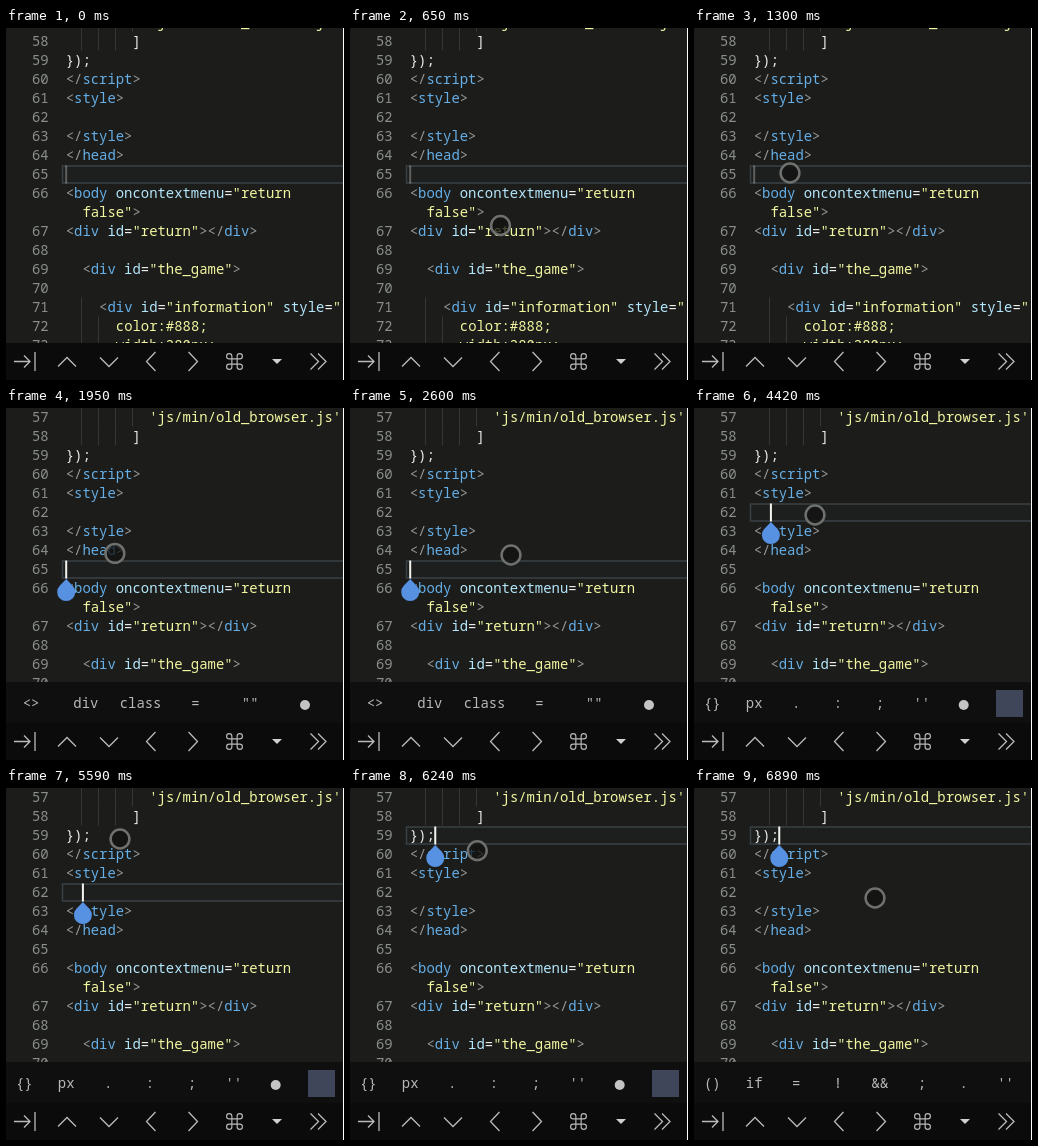
An HTML page that plays this animation: 338x352 px, repeating every 7.28 s.

```html
<!DOCTYPE html>
<html lang="en">
<head>
<meta charset="utf-8">
<title>Code editor</title>
<style>
html, body { margin: 0; width: 100%; height: 100%; overflow: hidden; background: #1c1d1b; }
svg { display: block; }
text { font: 500 13.92px "Noto Sans Mono", "DejaVu Sans Mono", monospace; white-space: pre; fill: #ececea; }
.num { font-weight: 400; fill: #8b8f8c; }
.g { fill: #969a9a; }
.b { fill: #65aee6; }
.a { fill: #b4e6fb; }
.y { fill: #f2f6a0; }
.guide { stroke: #343733; }
.key { font-weight: 400; text-anchor: middle; fill: #b8b8b8; }
.icons { fill: none; stroke: #bababa; stroke-width: 1.3; }
</style>
</head>
<body>
<svg width="338" height="352" viewBox="0 0 338 352">
  <rect width="338" height="352" fill="#1c1d1b"/>
  <g id="page">
    <rect id="current" x="56.5" width="290" height="17" fill="#1d1f1f" stroke="#3a4144" stroke-width="1.5"/>
    <g id="code"></g>
    <g id="caret">
      <rect x="-.5" y="-8.5" width="2" height="18" fill="#f4f4ee"/>
      <path id="handle" d="M.5 10l6.5 6.8A9 9 0 1 1-6 16.8z" fill="#5691e2"/>
    </g>
  </g>
  <circle id="ring" r="9.4" fill="#111" fill-opacity=".75" stroke="#6f716e" stroke-width="2.5"/>
  <g id="bars"></g>
  <rect y="315" width="338" height="37" fill="#0b0b0c"/>
  <g class="icons">
    <path d="M8 333.5H24M18 327.5l6 6-6 6M29 324v19"/>
    <path d="M52 338.5l9-9 9 9M94 329.5l9 9 9-9"/>
    <path d="M149.5 324l-9 9.5 9 9.5M182.5 324l9 9.5-9 9.5"/>
    <path transform="translate(228.5 333.5) scale(.88)" d="M-3 3V-6a3 3 0 1 0-3 3H6a3 3 0 1 0-3-3V6a3 3 0 1 0 3-3H-6a3 3 0 1 0 3 3z"/>
    <path d="M266 331h10l-5 5z" fill="#d0d0d0" stroke="none"/>
    <path d="M304.5 325.5l8 8-8 8M312 325.5l8 8-8 8"/>
  </g>
  <rect x="337" width="1" height="352" fill="#fff"/>
</svg>
<script>
const $ = id => document.getElementById(id);
const LEFT = 59.7, CHAR = 8.352, ROW = 19, STEP = 130, LOOP = 7280;
const rowY = i => 9 + ROW * i;
const esc = s => s.replace(/&/g, '&amp;').replace(/</g, '&lt;');

// Each piece of a row starts with its colour class; "w" is plain.
const tag = (name, end = '') => `g<${end}|b${name}|g>`;
const rows = [
  [57, 10, "y'js/min/old_browser.js'"],
  [58, 8, 'w]'],
  [59, 0, 'w});'],
  [60, 0, tag('script', '/')],
  [61, 0, tag('style')],
  [62, 0, ''],
  [63, 0, tag('style', '/')],
  [64, 0, tag('head', '/')],
  [65, 0, ''],
  [66, 0, 'g<|bbody|a oncontextmenu|w=|y"return'],
  ['', 2, 'yfalse"|g>'],
  [67, 0, 'g<|bdiv|a id|w=|y"return"|g></|bdiv|g>'],
  [68, 0, ''],
  [69, 2, 'g<|bdiv|a id|w=|y"the_game"|g>'],
  [70, 0, ''],
  [71, 4, 'g<|bdiv|a id|w=|y"information"|a style|w=|y"'],
  [72, 6, 'ycolor:#888;'],
  [73, 6, 'ywidth:280px;']
];

$('code').innerHTML = rows.map(([num, indent, src], i) => {
  const y = rowY(i), base = y + 5;
  let out = `<text class="num" x="26" y="${base}">${num}</text>`;
  for (let c = 2; c < indent; c += 2) {
    const x = Math.round(LEFT + c * CHAR) - .5;
    out += `<path class="guide" d="M${x} ${y - 9.5}v${ROW}"/>`;
  }
  const spans = src.split('|').map(p => `<tspan class="${p[0]}">${esc(p.slice(1))}</tspan>`);
  return out + `<text x="${LEFT + indent * CHAR}" y="${base}">${spans.join('')}</text>`;
}).join('');

// Key rows: "@" is the round button, "#" the colour swatch.
const bars = [
  ['<> div class = "" @', 25, 54.8],
  ["{} px . : ; '' @ #", 18.3, 41.9],
  ["() if = ! && ; . ''", 18.3, 41.9]
];
$('bars').innerHTML = bars.map(([keys, start, gap]) =>
  '<g><rect y="274" width="338" height="42" fill="#0f0f10"/>' +
  keys.split(' ').map((k, i) => {
    const x = start + gap * i;
    if (k === '@') return `<circle cx="${x}" cy="297" r="5" fill="#c4c4c4"/>`;
    if (k === '#') return '<rect x="302" y="282" width="27" height="27" fill="#40465a"/>';
    return `<text class="key" x="${x}" y="299.5">${esc(k)}</text>`;
  }).join('') + '</g>').join('');

// Touch ring: time, x, y
const path = [
  [0, 205, 250], [1300, 96, 145], [1690, 96, 145], [2600, 161, 147],
  [2730, 161, 147], [3380, 116, 106], [3640, 116, 106], [3770, 121, 107],
  [4550, 121, 107], [5590, 114, 51], [5980, 114, 51], [6890, 181, 110], [LOOP, 181, 110]
];
const ease = p => p * p * (3 - 2 * p);

function ringAt(t) {
  const i = path.findIndex(k => k[0] > t);
  const [t0, x0, y0] = path[i - 1], [t1, x1, y1] = path[i];
  const p = ease((t - t0) / (t1 - t0));
  return [x0 + (x1 - x0) * p, y0 + (y1 - y0) * p];
}

function draw(now) {
  const t = Math.floor(now % LOOP / STEP) * STEP;
  const focused = t >= 1820;
  const [row, col] = t < 3640 ? [8, 0] : t < 6110 ? [5, 2] : [2, 3];
  const bar = !focused ? -1 : t < 4160 ? 0 : t < 6630 ? 1 : 2;
  const y = rowY(row);

  $('page').setAttribute('transform', `translate(0 ${focused ? 0 : -15})`);
  $('current').setAttribute('y', y - 8);
  $('caret').setAttribute('transform', `translate(${LEFT + col * CHAR} ${y})`);
  $('caret').setAttribute('opacity', focused ? 1 : .3);
  $('handle').setAttribute('visibility', focused ? 'visible' : 'hidden');
  [...$('bars').children].forEach((g, i) => g.setAttribute('visibility', i === bar ? 'visible' : 'hidden'));

  const [rx, ry] = ringAt(t);
  $('ring').setAttribute('transform', `translate(${rx} ${ry})`);
  $('ring').setAttribute('opacity', Math.min(1, t / 390));
}

const begin = performance.now();
function tick() {
  draw(performance.now() - begin);
  requestAnimationFrame(tick);
}
tick();
</script>
</body>
</html>
```
